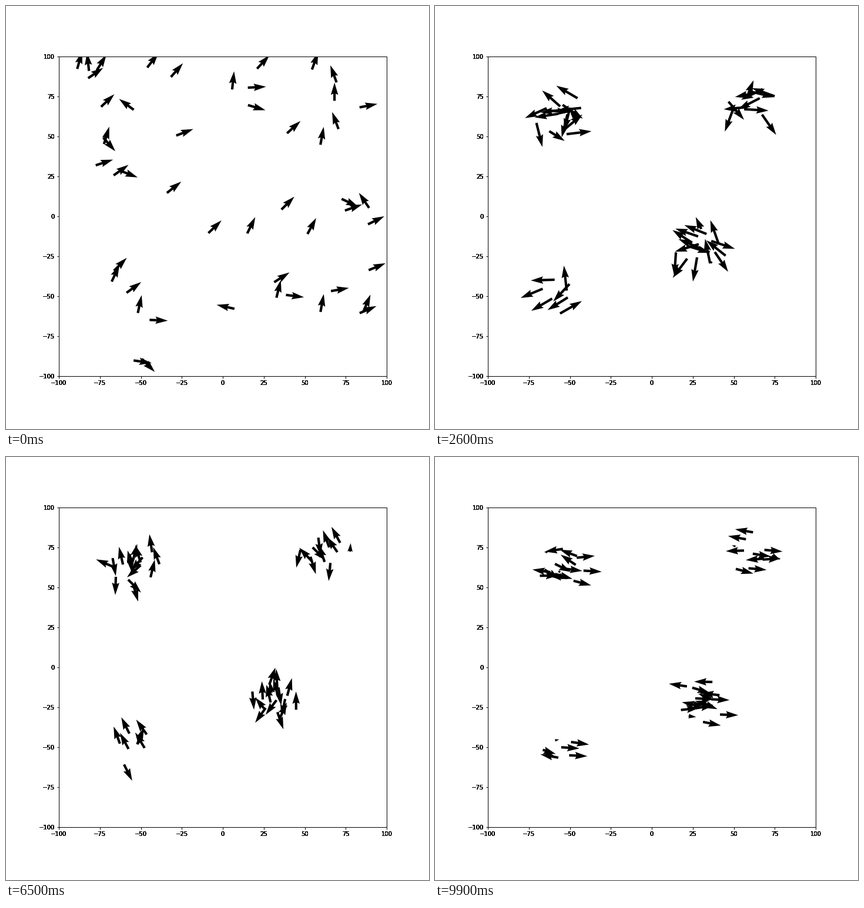
These frames come from a looping animation (720x720 px, 10 s). A matplotlib script:

```python
import numpy as np
import matplotlib.pyplot as plt
from matplotlib.animation import FuncAnimation

FRAMES, STEP = 100, 100      # count, ms per frame
END = 9.9                    # time of the last pose, s
JOIN = 2.9                   # time until the flocks are formed, s
SPIN = np.radians(74)        # turning rate of a settled flock, rad/s
RADIUS = 3                   # turning radius, data units
GOLDEN = np.pi * (3 - 5 ** 0.5)

# birds, flock centre, flock half-size, starting area (x range, y range)
FLOCKS = [
    (15, (-54, 63), (15, 11), (-89, -25), (9, 98)),
    (11, (61, 72), (14, 11), (4, 88), (34, 98)),
    (17, (30, -21), (14, 12), (-18, 95), (-66, 14)),
    (7, (-56, -50), (10, 12), (-72, -43), (-98, -26)),
]

rng = np.random.default_rng(12)


def unit(angle):
    return np.column_stack([np.cos(angle), np.sin(angle)])


def smooth(x):
    x = np.clip(x, 0, 1)
    return x * x * (3 - 2 * x)


def scatter(n, xs, ys):
    return np.column_stack([rng.uniform(*xs, n), rng.uniform(*ys, n)])


def disc(n, mid, size):
    """Evenly filled ellipse."""
    k = np.arange(n) + 0.5
    return mid + size * unit(k * GOLDEN) * np.sqrt(k / n)[:, None]


start = np.vstack([scatter(n, xs, ys) for n, _, _, xs, ys in FLOCKS])
home = np.vstack([disc(n, mid, size) for n, mid, size, _, _ in FLOCKS])
count = len(home)

launch = unit(np.radians(rng.normal(50, 45, count)))
# Settled birds share one axis but fly either way along it
way = np.radians(rng.choice([-8, 172], count) + rng.normal(0, 11, count))
stray = np.radians(rng.normal(0, 6, count))
rate = rng.uniform(0.3, 0.6, count)
phase = rng.random(count)


def pose(t):
    """Tail positions and velocities of all birds at time t in seconds."""
    joined = smooth(t / JOIN)
    angle = way + (SPIN + stray) * (t - END)
    orbit = home + RADIUS * unit(angle - np.pi / 2)
    flown = start + launch * 8 * t
    pos = flown + (orbit - flown) * joined

    vel = launch + (unit(angle) - launch) * joined
    pause = np.clip(6 * np.abs(np.sin(np.pi * (rate * t + phase))), 0, 1)
    surge = 1 + 0.5 * np.sin(np.pi * np.clip(t / 3.6, 0, 1))
    pace = (1 + (pause - 1) * joined) * surge
    return pos, vel * pace[:, None]


fig = plt.figure(figsize=(10, 10), dpi=72)
ax = fig.add_axes([0.125, 0.125, 0.775, 0.755],
                  xlim=(-100, 100), ylim=(-100, 100))
ticks = range(-100, 101, 25)
ax.set_xticks(ticks)
ax.set_yticks(ticks)
ax.tick_params(width=1)
ax.spines[:].set_linewidth(1)


def thicken_labels(layers=6):
    """Print the tick labels several times over for a heavier look."""
    x_place, x_va, x_ha = ax.get_xaxis_text1_transform(7)
    y_place, y_va, y_ha = ax.get_yaxis_text1_transform(7)
    for tick in ticks:
        text = str(tick).replace("-", "\N{MINUS SIGN}")
        for _ in range(layers):
            ax.text(tick, 0, text, transform=x_place, va=x_va, ha=x_ha)
            ax.text(0, tick, text, transform=y_place, va=y_va, ha=y_ha)


thicken_labels()
pos, vel = pose(0)
arrows = ax.quiver(*pos.T, *vel.T, scale=18, width=0.0075)


def update(frame):
    pos, vel = pose(frame * STEP / 1000)
    arrows.set_offsets(pos)
    arrows.set_UVC(*vel.T)
    return arrows,


anim = FuncAnimation(fig, update, frames=FRAMES, interval=STEP,
                     repeat=True, repeat_delay=0)
plt.show()
```
